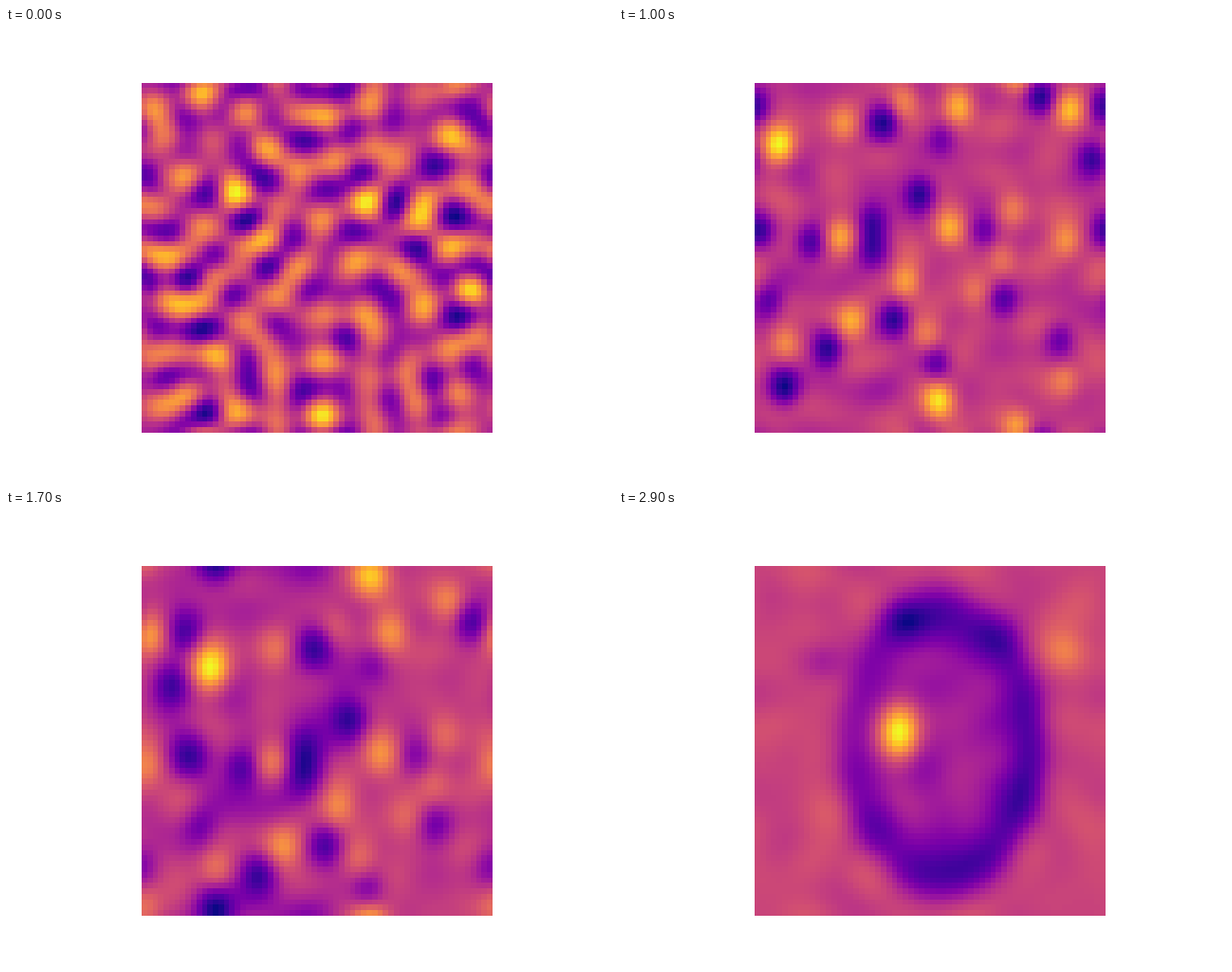
Recreate the animation shown at these times as a matplotlib script. Size 640 by 480 pixels, loop 4000 ms.

```python
import numpy as np
import matplotlib.pyplot as plt
from matplotlib.animation import FuncAnimation

CELLS, SIDE = 64, 369.6
LEFT, TOP = 143.2, 57.6
DRIFT = np.array([6.7, 6.4])  # pixels per frame
SPOT_FRAME, LAST = 13, 29
KNOTS = [0, 6, 13, 21, 25, 29]

# x, y, strength in percent
BRIGHT = [
    (189, 143, 52), (379, 103, 40), (495, 107, 48), (440, 70, 34),
    (357, 412, 50), (367, 232, 40), (323, 287, 36), (252, 240, 40),
    (266, 330, 35), (195, 352, 28), (345, 343, 28), (320, 98, 28),
    (258, 122, 28), (435, 210, 24), (424, 262, 24), (395, 298, 22),
    (492, 245, 30), (490, 390, 26),
]
DARK = [
    (162, 103, 38), (150, 158, 38), (465, 92, 48), (338, 195, 44),
    (287, 225, 36), (287, 252, 32), (222, 247, 34), (310, 327, 42),
    (240, 358, 40), (195, 400, 42), (178, 308, 34), (167, 234, 30),
    (425, 305, 34), (404, 233, 34), (355, 374, 36), (485, 347, 26),
    (299, 120, 38), (360, 136, 26),
]

rng = np.random.default_rng(7)
centres = (np.arange(CELLS) + .5) * SIDE / CELLS
grid_x, grid_y = np.meshgrid(LEFT + centres, TOP + centres)
freq = np.fft.fftfreq(CELLS, 1 / CELLS)
freq_x, freq_y = np.meshgrid(freq, freq)
wave = np.hypot(freq_x, freq_y)
spectrum = np.fft.fft2(rng.standard_normal((CELLS, CELLS)))


def offset(x, y):
    """Shortest way from a point to each cell of the periodic square."""
    return [(d + SIDE / 2) % SIDE - SIDE / 2 for d in (grid_x - x, grid_y - y)]


def spot(x, y, strength, width, height):
    u, v = offset(x, y)
    return strength * np.exp(-((u / width) ** 2 + (v / height) ** 2) / 2)


def streaks(n):
    """Drifting band-limited noise that grows coarser with time."""
    peak = np.interp(n, KNOTS, [7, 6, 5, 4.5, 4.2, 4])
    band = np.exp(-((wave - peak) / 2.2) ** 2)
    sx, sy = DRIFT * n / SIDE
    phase = np.exp(-2j * np.pi * (freq_x * sx + freq_y * sy))
    noise = np.fft.ifft2(spectrum * band * phase).real
    return noise / noise.std()


def spots(n):
    sx, sy = DRIFT * (n - SPOT_FRAME)
    size = np.sqrt(100 + 8 * max(n - 6, -4))
    total = 0
    for sign, points in ((1, BRIGHT), (-1, DARK)):
        for x, y, percent in points:
            total = total + spot(x + sx, y + sy, sign * percent / 100, size, 1.2 * size)
    return total


def vortex(n):
    """Bright core inside an uneven dark ring."""
    sx, sy = DRIFT * (n - LAST)
    u, v = offset(340 + sx, 245 + sy)
    radius, angle = np.hypot(u / 93, v / 136), np.arctan2(v, u)
    depth = .34 + .1 * np.cos(angle) - .04 * np.cos(2 * angle)
    ring = -depth * np.exp(-((radius - 1) / .23) ** 2)
    inside = -.17 / (1 + np.exp((radius - .85) / .07))
    core = spot(295 + sx, 234 + sy, .72, 15, 21)
    top = spot(298 + sx, 115 + sy, -.17, 17, 14)
    tail = spot(215 + sx, 160 + sy, -.15, 17, 15)
    ember = spot(471 + sx, 150 + sy, .18, 15, 15)
    return ring + inside + core + top + tail + ember


def field(n):
    parts = (
        (streaks, [.18, .04, .03, .03, .03, .03]),
        (spots, [.15, 1, 1, .7, .35, .04]),
        (vortex, [0, 0, .12, .5, .8, 1]),
    )
    return sum(np.interp(n, KNOTS, weights) * part(n) for part, weights in parts)


fig, ax = plt.subplots(figsize=(6.4, 4.8), dpi=100)
ax.axis("off")
image = ax.imshow(field(0), cmap="plasma", interpolation="nearest")


def update(n):
    values = field(min(n, LAST))
    image.set_data(values)
    image.set_clim(values.min(), values.max())
    return [image]


anim = FuncAnimation(fig, update, frames=40, interval=100, repeat=True, repeat_delay=0)
plt.show()
```
